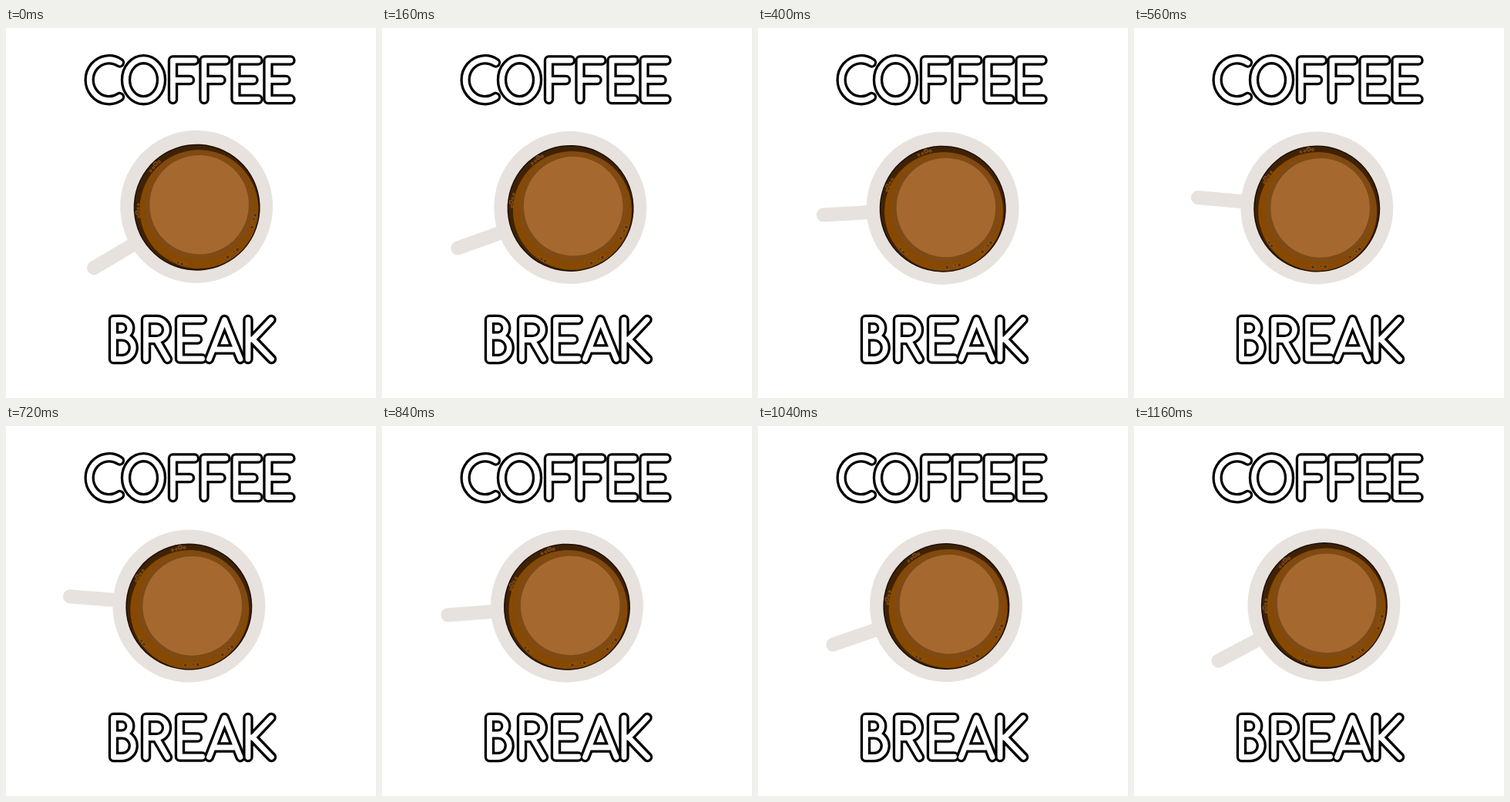
Animation, 480 px wide and 480 px high, one loop 1.2 s. Source, as an HTML page:

```html
<!DOCTYPE html>
<html lang="en">
<head>
<meta charset="utf-8">
<title>Coffee break</title>
<style>
  html, body { margin: 0; height: 100%; overflow: hidden; background: #fff; }
  svg { display: block; width: 100vw; height: 100vh; }
  .letters { fill: none; stroke-linecap: round; stroke-linejoin: round; }
</style>
</head>
<body>
<svg viewBox="0 0 480 480" role="img" aria-label="COFFEE BREAK">
  <defs>
    <path id="F" d="M28 0H0V50.500M0 25.500H22"/>
    <path id="E" d="M29 0H0V50.500H29M0 25.500H23"/>
    <g id="words">
      <path d="M147.500 45A25.500 26.500 0 1 0 147.500 89.500"/>
      <ellipse cx="178.500" cy="67.200" rx="23" ry="26.500"/>
      <use href="#F" x="216.500" y="42"/>
      <use href="#F" x="257" y="42"/>
      <use href="#E" x="298" y="42"/>
      <use href="#E" x="340" y="42"/>
      <path d="M139.500 400V378.500H150a10.700 10.700 0 0 1 0 21.500H139.500V429.500H150.500a14.700 14.700 0 0 0 0 -29.500"/>
      <path d="M181.500 429.500V378.500H195.500a13 13 0 0 1 0 26H181.500M195 404.500L209.500 429.500"/>
      <use href="#E" x="225.500" y="378.500"/>
      <path d="M263.500 429.500L283.500 378.500L304 429.500M268.500 417H299"/>
      <path d="M314 378.500V429.500M344 378.500L320 404L344.500 429.500M320 404H314"/>
    </g>
  </defs>

  <g class="letters">
    <use href="#words" stroke="#000" stroke-width="13.400"/>
    <use href="#words" stroke="#fff" stroke-width="6.800"/>
  </g>

  <g id="cup">
    <path d="M-155 0H-90" stroke="#e7e2dd" stroke-width="18" stroke-linecap="round"/>
    <circle r="99" fill="#e7e2dd"/>
    <circle cy="1" r="82" fill="#1e0f03"/>
    <circle cy="1" r="80.500" fill="#3f2205"/>
    <circle cx="1.200" cy="4.500" r="77" fill="#874900"/>
    <circle cx="3.800" cy="0" r="71" fill="#7f4a13"/>
    <circle cx="4.300" cy="-.4" r="64.300" fill="#a5682f"/>
    <g id="bubbles" fill="#5a3208" stroke="#9a6029" stroke-width=".8"/>
  </g>
</svg>
<script>
const cup = document.getElementById("cup");

// Small clusters of bubbles along the rim, by angle in degrees.
let bubbles = "";
for (const mid of [45, 83, 137, 207, 255]) {
  for (let i = 0; i < 4; i++) {
    const wave = Math.sin(mid + i * 2);
    bubbles += `<circle r="${1.8 + wave * .8}" transform="rotate(${mid + i * 4 - 6}) translate(${76 + wave})"/>`;
  }
}
document.getElementById("bubbles").innerHTML = bubbles;

const STEP = 40, COUNT = 30, TURN = 16, HOLD = 12;
const LOW = 30.8, SWING = 41.25;

// Even swing up with one held step, then an even swing back.
function tilt(step) {
  if (step > TURN) return LOW - SWING * (COUNT - step) / (COUNT - TURN);
  return LOW - SWING * (step < HOLD ? step : step - 1) / (TURN - 1);
}

function draw(now) {
  const step = Math.floor(now / STEP) % COUNT;
  cup.setAttribute("transform",
    `translate(239.7 217.4) rotate(${-tilt(step)}) translate(-1 16.2)`);
  requestAnimationFrame(draw);
}
draw(0);
</script>
</body>
</html>
```
